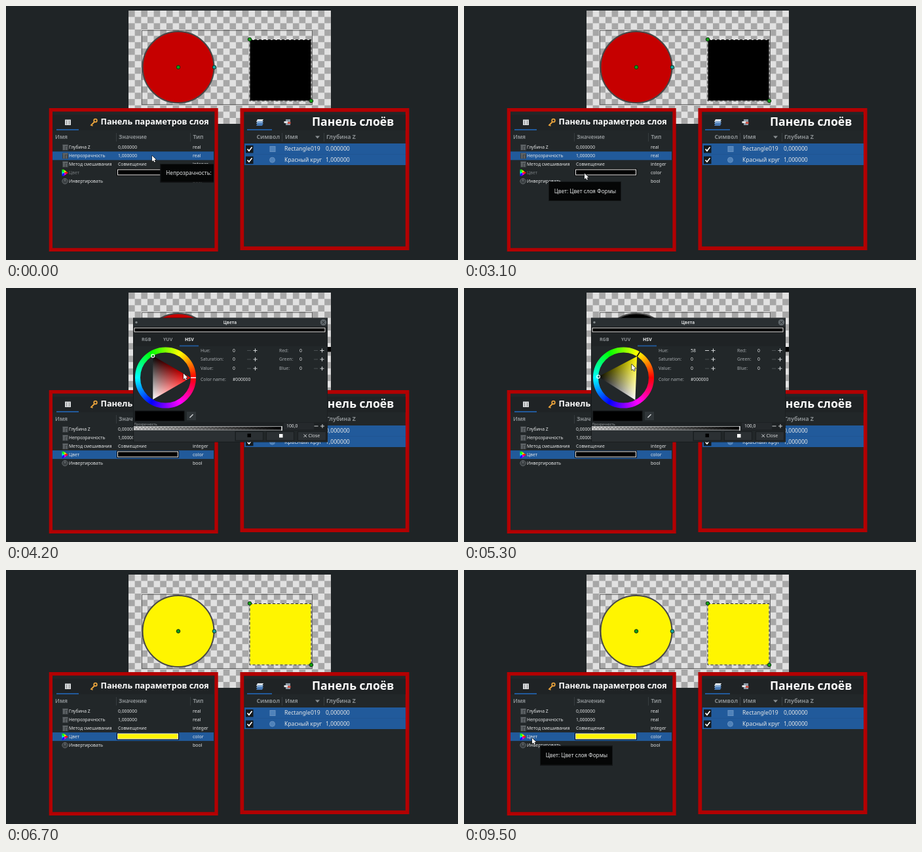
An HTML page with a canvas for the animation above (10 s loop, 690x388 px).

```html
<!DOCTYPE html>
<html lang="ru">
<head>
<meta charset="utf-8">
<title>Цвет слоя</title>
<style>
html, body { margin: 0; width: 100%; height: 100%; overflow: hidden; background: #1f2426; }
canvas { display: block; width: 690px; height: 388px; }
</style>
</head>
<body>
<canvas id="stage" width="690" height="388"></canvas>
<script>
const g = document.getElementById('stage').getContext('2d');
const LOOP = 10000, STEP = 100, TAU = Math.PI * 2;
const UI = '"Noto Sans", "Open Sans", sans-serif';
const BLUE = '#215a9b', PANEL = '#222729', FRAME = '#b30002';
const HEAD = '#898e91', RULE = '#363c3f';
const WHEEL = { x: 243.5, y: 137, inner: 38.5, outer: 46.5 };
const HUE = 57.65;

// Pointer strokes: each is a list of [time, x, y]; hidden between strokes.
const strokes = [
  [[0, 223, 228], [900, 223, 228], [1000, 222, 227], [1100, 222, 227], [1800, 107, 257],
   [2200, 116, 256], [2600, 116, 256], [3100, 184, 255], [3300, 198, 252], [3400, 198, 252]],
  [[3900, 212, 184], [4200, 271, 130], [4400, 283, 134], [4600, 284, 136]],
  [[5000, 266, 101], [5300, 256, 116], [5400, 256, 116], [5800, 264, 104], [5900, 264, 104],
   [6500, 459, 222], [6600, 459, 222]],
  [[8300, 280, 162], [8700, 176, 216], [9100, 104, 256], [9900, 104, 256]]
];

const ramp = (t, a, b) => Math.min(1, Math.max(0, (t - a) / (b - a)));
const css = c => `rgb(${c.map(Math.round).join(',')})`;

function rect(x, y, w, h, fill) {
  g.fillStyle = fill;
  g.fillRect(x, y, w, h);
}

function box(x, y, w, h, stroke, width = 1) {
  g.strokeStyle = stroke;
  g.lineWidth = width;
  g.strokeRect(x, y, w, h);
}

function disc(x, y, r, fill, stroke, width = 1) {
  g.beginPath();
  g.arc(x, y, r, 0, TAU);
  if (fill) { g.fillStyle = fill; g.fill(); }
  if (stroke) { g.strokeStyle = stroke; g.lineWidth = width; g.stroke(); }
}

function line(stroke, width, ...p) {
  g.beginPath();
  for (let i = 0; i < p.length; i += 2) g.lineTo(p[i], p[i + 1]);
  g.strokeStyle = stroke;
  g.lineWidth = width;
  g.stroke();
}

function poly(fill, ...p) {
  g.beginPath();
  for (let i = 0; i < p.length; i += 2) g.lineTo(p[i], p[i + 1]);
  g.closePath();
  g.fillStyle = fill;
  g.fill();
}

// y is the vertical centre of the lowercase letters
function text(s, x, y, size, fill = '#e4e6e7', weight = 400, align = 'left') {
  g.font = `${weight} ${size}px ${UI}`;
  g.textAlign = align;
  g.fillStyle = fill;
  g.fillText(s, x, y + size * 0.32);
}

function clipped(x, y, w, h, draw) {
  g.save();
  g.beginPath();
  g.rect(x, y, w, h);
  g.clip();
  draw();
  g.restore();
}

function checker(x, y, w, h, size, light, dark) {
  clipped(x, y, w, h, () => {
    rect(x, y, w, h, light);
    for (let r = 0; r * size < h; r++)
      for (let c = r % 2; c * size < w; c += 2)
        rect(x + c * size, y + r * size, size, size, dark);
  });
}

// Colour field: dark edge, light inner line, then the fill
function swatchBox(x, y, w, h, fill) {
  rect(x, y, w, h, '#060606');
  rect(x + 1, y + 1, w - 2, h - 2, '#ededed');
  rect(x + 2, y + 2, w - 4, h - 4, fill);
}

function hueWheel(x, y) {
  const wheel = g.createConicGradient(0, x, y);
  for (let i = 0; i <= 6; i++) wheel.addColorStop(i / 6, `hsl(${360 - i * 60},100%,50%)`);
  return wheel;
}

function hueColor(h) {
  const f = n => {
    const k = (n + h / 60) % 6;
    return 255 * (1 - Math.max(0, Math.min(k, 4 - k, 1)));
  };
  return [f(5), f(3), f(1)];
}

function onWheel(deg, r) {
  const a = -deg * Math.PI / 180;
  return [WHEEL.x + r * Math.cos(a), WHEEL.y + r * Math.sin(a)];
}

function pointerAt(t) {
  if (t > 4600 && t < 5000) return onWheel(HUE * ramp(t, 4600, 5000), 42);
  const path = strokes.find(s => t >= s[0][0] && t <= s[s.length - 1][0]);
  if (!path) return null;
  const i = Math.max(1, path.findIndex(k => k[0] >= t));
  const a = path[i - 1], b = path[i], u = ramp(t, a[0], b[0]);
  return [a[1] + (b[1] - a[1]) * u, a[2] + (b[2] - a[2]) * u];
}

function pickerAt(t) {
  const hue = HUE * ramp(t, 4600, 5000);
  const tip = onWheel(hue, WHEEL.inner);
  const black = onWheel(hue + 120, WHEEL.inner);
  const white = onWheel(hue - 120, WHEEL.inner);
  let mark = black, h = 0, w = 0;
  if (t >= 5500) {
    mark = t < 5800 ? pointerAt(t) : tip;
    // barycentric weights of the hue and white corners
    const [ax, ay] = [tip[0] - black[0], tip[1] - black[1]];
    const [bx, by] = [white[0] - black[0], white[1] - black[1]];
    const [px, py] = [mark[0] - black[0], mark[1] - black[1]];
    const d = ax * by - ay * bx;
    h = Math.min(1, Math.max(0, (px * by - py * bx) / d));
    w = Math.min(1 - h, Math.max(0, (ax * py - ay * px) / d));
  }
  const pure = hueColor(hue);
  const rgb = pure.map(c => Math.round(c * h + 255 * w));
  const val = h + w;
  return { hue, tip, black, white, mark, pure, rgb, val, sat: val ? h / val : 0 };
}

function handle(x, y, fill) {
  disc(x, y, 2.8, fill, '#123018', 1);
}

function scene(circle, square) {
  checker(187, 7, 309, 173, 9.65, '#e1e1e1', '#a7a7a7');
  box(207.5, 37.5, 260, 113, '#666');
  disc(263, 93.5, 54.5, circle, '#484848', 2);
  rect(372, 51, 94, 94, square);
  box(372, 51.5, 94, 93.5, '#d8d8d8');
  g.setLineDash([4, 3]);
  box(372, 51.5, 94, 93.5, '#222');
  g.setLineDash([]);
  handle(263, 93.5, '#12a012');
  handle(372, 51, '#12a012');
  handle(466, 145, '#12a012');
  handle(318, 93.5, '#19a3a3');
}

function frame(x, y, w, h, b) {
  rect(x, y, w, h, FRAME);
  rect(x + b, y + b, w - 2 * b, h - 2 * b, PANEL);
}

function rowIcon(i, y) {
  if (i === 3) {
    poly(hueWheel(89, y), 85.5, y - 5, 88, y - 5, 95, y, 88, y + 5, 85.5, y + 5);
  } else if (i === 4) {
    disc(90, y, 4.2, '#3b4043', '#62686b');
    line('#84898c', 1, 90, y - 3, 90, y);
  } else {
    rect(86, y - 4.5, 9, 9, '#42474a');
    line('#7d8285', 1, 87, y - 3, 94, y - 3);
    line('#7d8285', 1, 88.5, y - 2, 88.5, y + 4);
    line('#7d8285', 1, 92, y - 1, 92, y + 4);
  }
}

function paramsPanel(selected, swatch) {
  frame(65.7, 156, 258, 219, 5.3);
  rect(71, 166, 246, 24, '#1f2325');
  rect(77, 188, 34, 2, BLUE);
  rect(90, 173.5, 9, 8.5, '#d5d8da');
  line('#777', 0.8, 92.5, 175, 92.5, 181);
  line('#777', 0.8, 96.5, 175, 96.5, 181);
  disc(136.5, 175, 2.3, null, '#e9a33c', 1.8);
  line('#e9a33c', 1.8, 135, 177, 130, 182, 132.5, 183);
  text('Панель параметров слоя', 144.5, 177, 12.6, '#fff', 700);

  text('Имя', 75, 200, 8.4, HEAD, 700);
  text('Значение', 172, 200, 8.4, HEAD, 700);
  text('Тип', 285.5, 200, 8.4, HEAD, 700);
  line(RULE, 1, 168.5, 194, 168.5, 207);
  line(RULE, 1, 281.5, 194, 281.5, 207);

  const names = ['Глубина Z', 'Непрозрачность', 'Метод смешивания', 'Цвет', 'Инвертировать'];
  const values = ['0,000000', '1,000000', 'Совмещение'];
  const types = ['real', 'real', 'integer', 'color', 'bool'];
  names.forEach((name, i) => {
    const y = 216 + i * 12.9;
    if (i === selected) rect(71, y - 6.6, 246, 13, BLUE);
    rowIcon(i, y);
    text(name, 96, y, 6.75, i === 3 && selected !== 3 ? '#747a7d' : '#e4e6e7');
    text(types[i], 285, y, 7);
    if (values[i]) text(values[i], 171, y, 6.8);
  });
  swatchBox(169, 248.5, 95, 11, css(swatch));
}

function layersPanel() {
  frame(357.5, 156, 258, 217, 5.7);
  rect(364, 166, 246, 24, '#1f2325');
  rect(368, 188, 38, 2, BLUE);
  ['#dfe5ea', '#7ea6d2', '#4779b5'].forEach((c, i) =>
    poly(c, 384, 173 + i * 3, 393, 173 + i * 3, 391, 177 + i * 3, 382, 177 + i * 3));
  rect(427, 173, 7, 9, '#8d9aa6');
  rect(424.5, 176, 6, 3, '#dfe3e6');
  rect(430, 177, 4.5, 3, '#cb5145');
  text('Панель слоёв', 467, 177, 17.6, '#fff', 700);

  text('Символ', 382.5, 200.5, 8.7, HEAD, 700);
  text('Имя', 426, 200.5, 8.7, HEAD, 700);
  text('Глубина Z', 489, 200.5, 8.7, HEAD, 700);
  poly(HEAD, 472, 198.5, 479, 198.5, 475.5, 202.5);
  line(RULE, 1, 421.5, 194, 421.5, 207);
  line(RULE, 1, 485.5, 194, 485.5, 207);

  rect(364, 210, 246, 33, BLUE);
  line('#1f5592', 1, 364, 226.5, 610, 226.5);
  [['Rectangle019', '0,000000'], ['Красный круг', '1,000000']].forEach(([name, depth], i) => {
    const y = 218.5 + i * 16.7;
    rect(366, y - 5.5, 11.5, 11.5, '#14181b');
    line('#fff', 1.7, 368.5, y, 371, y + 2.8, 375.5, y - 3);
    if (i) disc(406.5, y, 4, '#4f82ba', '#6690c0');
    else { rect(403, y - 4, 8, 8, '#4f82ba'); box(403, y - 4, 8, 8, '#6690c0'); }
    text(name, 425, y, 8.6);
    text(depth, 488, y, 8.6);
  });
}

function wheel(p) {
  const { x, y, inner, outer } = WHEEL;
  disc(x, y, (inner + outer) / 2, null, hueWheel(x, y), outer - inner);
  const a = onWheel(p.hue, inner), b = onWheel(p.hue, outer);
  line(p.hue > 20 ? '#000' : '#fff', 1.5, ...a, ...b);

  const corners = [...p.tip, ...p.black, ...p.white];
  const fade = (from, q, r, c) => {
    const k = g.createLinearGradient(...from, (q[0] + r[0]) / 2, (q[1] + r[1]) / 2);
    k.addColorStop(0, css(c));
    k.addColorStop(1, '#000');
    return k;
  };
  poly('#000', ...corners);
  g.globalCompositeOperation = 'lighter';
  poly(fade(p.tip, p.black, p.white, p.pure), ...corners);
  poly(fade(p.white, p.tip, p.black, [255, 255, 255]), ...corners);
  g.globalCompositeOperation = 'source-over';
  disc(...p.mark, 2.4, null, p.val > 0.6 ? '#000' : '#fff', 1.2);
}

function spin(label, value, max, x, vx, bx, y) {
  const on = '#d0d3d5', off = '#4a5053';
  text(label, x, y, 6.8, '#a5aaad');
  text(String(value), vx, y, 6.8);
  const less = value > 0 ? on : off, more = value < max ? on : off;
  line(less, 1, bx - 3, y, bx + 3, y);
  line(more, 1, bx + 6.5, y, bx + 12.5, y);
  line(more, 1, bx + 9.5, y - 3, bx + 9.5, y + 3);
}

function dialog(p) {
  const color = css(p.rgb);
  rect(490, 90, 6, 7.5, color);
  rect(194, 45.5, 297, 190, '#15191b');
  rect(195, 46, 295.5, 189, PANEL);
  rect(195, 46, 295.5, 13, '#2a2f32');
  disc(199, 52.5, 1.7, '#82888b');
  text('Цвета', 342, 52.5, 6.5, '#d8dadb', 700, 'center');
  disc(484.5, 52.5, 4.8, '#60676b');
  line('#202426', 1, 482.5, 50.5, 486.5, 54.5);
  line('#202426', 1, 486.5, 50.5, 482.5, 54.5);
  swatchBox(194.5, 59.5, 294, 9, color);

  rect(195, 70, 295.5, 19, '#1f2325');
  text('RGB', 207, 79, 7, '#8d9295', 700);
  text('YUV', 240, 79, 7, '#8d9295', 700);
  text('HSV', 273, 79, 7, '#eceeef', 700);
  rect(265, 87.5, 29, 1.8, BLUE);
  wheel(p);

  const [r, gr, b] = p.rgb, pct = v => Math.round(v * 100);
  spin('Hue:', Math.round(p.hue), 360, 297, 346, 371, 95.5);
  spin('Saturation:', pct(p.sat), 100, 297, 346, 371, 109);
  spin('Value:', pct(p.val), 100, 297, 346, 371, 123);
  spin('Red:', r, 255, 417, 448, 473, 95.5);
  spin('Green:', gr, 255, 417, 448, 473, 109);
  spin('Blue:', b, 255, 417, 448, 473, 123);
  text('Color name:', 297, 140, 6.8, '#a5aaad');
  const hex = p.rgb.map(v => v.toString(16).padStart(2, '0')).join('').toUpperCase();
  text('#' + hex, 346, 140, 6.7);

  rect(196.5, 187.5, 76, 16, '#0d0f10');
  rect(197.5, 188.5, 74, 14, color);
  rect(276, 189, 14, 13, '#303639');
  line('#d0d3d5', 1.4, 280.5, 198, 285.5, 193);

  rect(195, 205, 295.5, 13, '#1d2123');
  text('Прозрачность', 195.5, 208, 5, '#9da2a5');
  checker(195, 211.5, 226, 5.5, 2.7, '#d5d5d5', '#9c9c9c');
  const fade = g.createLinearGradient(195, 0, 421, 0);
  fade.addColorStop(0, `rgba(${p.rgb},0)`);
  fade.addColorStop(1, color);
  rect(195, 211.5, 226, 5.5, fade);
  box(195.5, 211.5, 225.5, 5.5, '#bfc1c2', 0.8);
  line('#fff', 1.2, 421, 211, 421, 218);
  spin('', 1, 2, 0, -50, 473.5, 211);
  rect(424, 206, 46, 10.5, '#25292c');
  text('100,0', 428, 211, 6.8);

  rect(195, 218.5, 154, 16, '#2b3033');
  [[350, 43], [397, 43], [445, 44]].forEach(([x, w]) => {
    rect(x, 219, w, 14.5, '#2b3033');
    box(x + 0.5, 219.5, w - 1, 13.5, '#191d1f');
  });
  rect(368.5, 222.5, 5.5, 5.5, '#000');
  rect(417, 223, 5.5, 5.5, '#fff');
  line('#d0d3d5', 1, 454.5, 223.5, 459, 228);
  line('#d0d3d5', 1, 459, 223.5, 454.5, 228);
  text('Close', 461.5, 225.5, 7, '#d8dadb');
}

function tooltip(s, x, y, w, h) {
  rect(x, y, w, h, '#050606');
  box(x + 0.5, y + 0.5, w - 1, h - 1, '#141718');
  text(s, x + 8.7, y + h / 2, 8.2);
}

function pointer(x, y) {
  g.save();
  g.translate(x, y + 0.7);
  g.scale(0.9, 0.9);
  g.beginPath();
  [[0, 0], [0, 9.6], [2.2, 7.7], [3.8, 11], [5.4, 10.2], [3.9, 7.1], [6.8, 6.8]]
    .forEach(q => g.lineTo(...q));
  g.closePath();
  g.lineJoin = 'round';
  g.fillStyle = '#fff';
  g.strokeStyle = '#15181a';
  g.lineWidth = 1.4;
  g.stroke();
  g.fill();
  g.restore();
}

function draw(t) {
  const p = pickerAt(t), color = css(p.rgb);
  rect(0, 0, 690, 388, '#1f2426');
  scene(t < 4700 ? '#c60000' : color, color);
  paramsPanel(t < 3300 ? 1 : 3, p.rgb);
  layersPanel();
  if (t >= 3500 && t < 6700) dialog(p);
  clipped(71, 161, 246, 209, () => {
    if (t < 1200) tooltip('Непрозрачность: ', 235.5, 241, 140, 28.5);
    if (t >= 2400 && t < 3300) tooltip('Цвет: Цвет слоя Формы', 129, 268, 111, 30);
    if (t >= 9400) tooltip('Цвет: Цвет слоя Формы', 116, 268.5, 111, 30);
  });
  const at = pointerAt(t);
  if (at) pointer(...at);
}

const start = performance.now();
function tick() {
  const t = (performance.now() - start) % LOOP;
  draw(Math.floor(t / STEP) * STEP);
  requestAnimationFrame(tick);
}
tick();
</script>
</body>
</html>
```
